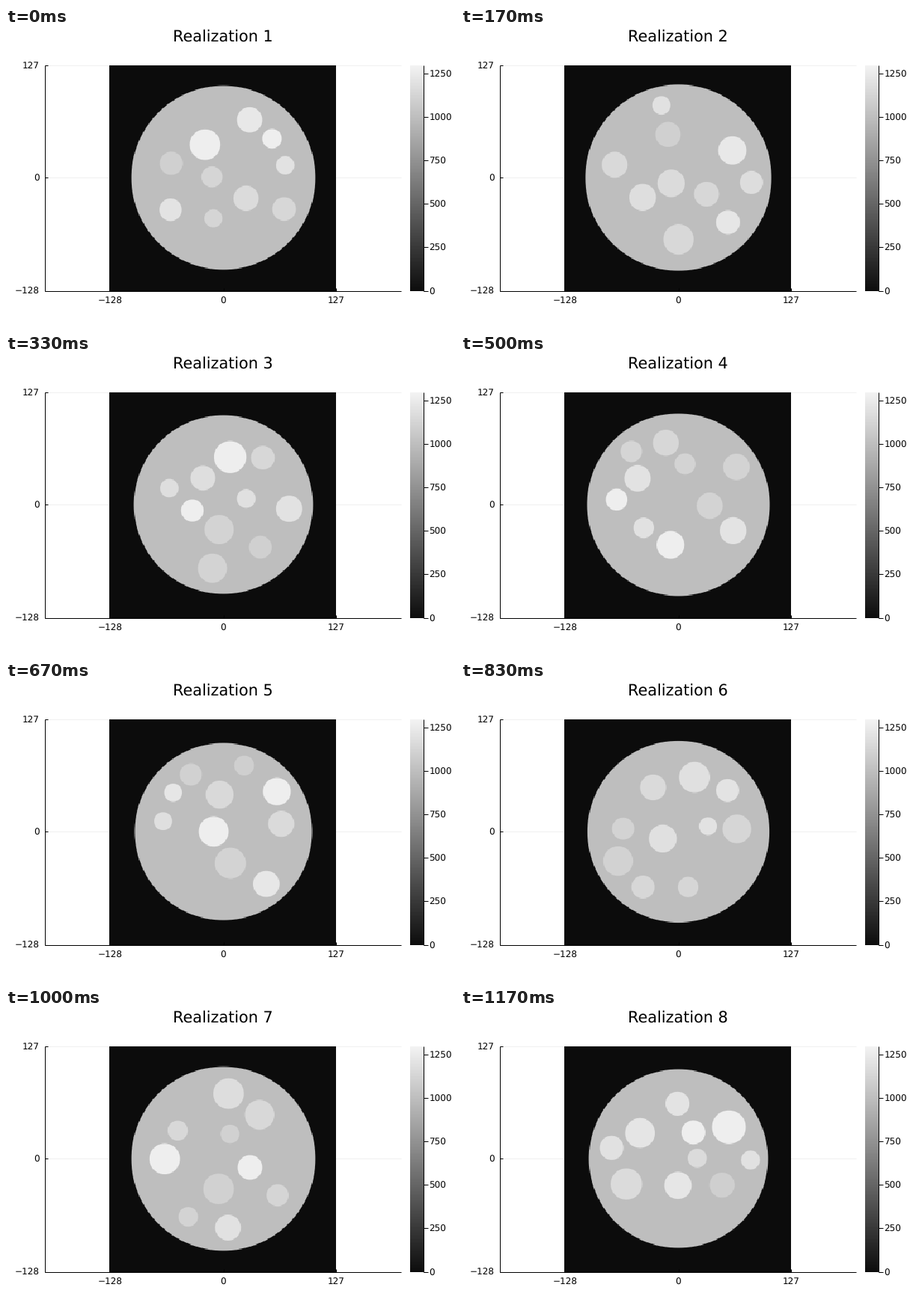
Animation, 600 px wide and 400 px high, one loop 1340 ms. Source, as a matplotlib script:

```python
import random

import matplotlib.pyplot as plt
import numpy as np
from matplotlib.animation import FuncAnimation

W, H, DPI = 600, 400, 100
PX = 72 / DPI                       # one pixel in points
LOOP, STEP = 1340, 10               # ms
STARTS = [0, 170, 330, 500, 670, 830, 1000, 1170]

LEFT, RIGHT, TOP, BOTTOM = 138, 441, 50, 352
CX, CY = 290.5, 200.2               # disc centre on the stage
CELL = 302 / 255                    # stage pixels per data cell
VMAX, BODY, BRIGHT = 1300, 1000, 1275
BUBBLES, GAP = 10, 5

# Disc radius and the brightest bubbles (x, y, radius) of each realization
SCENES = [
    (123, [(266, 156, 20.5), (355.5, 148, 13)]),
    (124.5, []),
    (119.5, [(299.5, 136.5, 21.5), (249, 208, 15)]),
    (122, [(280, 254, 18.5), (208, 193.5, 14.5)]),
    (118.5, [(277.5, 200, 20), (362, 146.5, 18.5)]),
    (121.5, []),
    (123, [(212, 200.5, 20.5), (326, 212, 16.5)]),
    (119.5, [(358, 158, 22.5), (310.5, 165, 16)]),
]

plt.rcParams["font.family"] = "DejaVu Sans"
plt.rcParams["text.hinting"] = "none"


def fill_disc(seed, disc, bright):
    """Add random bubbles that touch neither each other nor the rim."""
    rng = random.Random(seed)
    bubbles = [(x, y, r, BRIGHT) for x, y, r in bright]
    while len(bubbles) < BUBBLES:
        r = rng.uniform(12, 21)
        x = CX + rng.uniform(-disc, disc)
        y = CY + rng.uniform(-disc, disc)
        inside = np.hypot(x - CX, y - CY) + r < disc - 2 * GAP
        if inside and all(np.hypot(x - a, y - b) > r + s + GAP
                          for a, b, s, _ in bubbles):
            bubbles.append((x, y, r, rng.uniform(1100, 1240)))
    return bubbles


def snap(pixels, centre):
    """Move pixel centres to the centre of the data cell they fall in."""
    return centre + CELL * np.round((pixels + 0.5 - centre) / CELL)


def shade(values):
    return 0.05 + 0.9 * values / VMAX


def phantom(disc, bubbles):
    x = snap(np.arange(LEFT, RIGHT), CX)[None, :]
    y = snap(np.arange(TOP, BOTTOM), CY)[:, None]
    field = np.zeros((BOTTOM - TOP, RIGHT - LEFT))
    for cx, cy, r, value in [(CX, CY, disc, BODY)] + bubbles:
        # Cells on the edge are only partly covered
        cover = np.clip((r - np.hypot(x - cx, y - cy)) / CELL + 0.5, 0, 1)
        field += cover * (value - field)
    return shade(field)


fig = plt.figure(figsize=(W / DPI, H / DPI), dpi=DPI, facecolor="white")
ax = fig.add_axes([0, 0, 1, 1])
ax.axis("off")


def show(data, left, right):
    return ax.imshow(data, cmap="gray", vmin=0, vmax=1, aspect="auto",
                     interpolation="nearest", zorder=2,
                     extent=(left, right, BOTTOM, TOP))


def line(x0, y0, x1, y1, color="black", z=3):
    ax.plot([x0, x1], [y0, y1], color=color, lw=PX,
            solid_capstyle="butt", zorder=z)


def label(x, y, text, size=12, ha="center"):
    return ax.text(x, y, text, fontsize=size * PX, ha=ha, va="baseline", zorder=4)


images = [phantom(disc, fill_disc(seed, disc, bright))
          for seed, (disc, bright) in enumerate(SCENES, 1)]
picture = show(images[0], LEFT, RIGHT)
ramp = np.linspace(VMAX, 0, BOTTOM - TOP)[:, None]
show(shade(ramp), 540, 558)

# Main axes
line(51.5, TOP, 51.5, BOTTOM)
line(52, 351.5, 528, 351.5)
for value in (-128, 0, 127):
    text = str(value).replace("-", "\u2212")
    x = CX + CELL * value
    y = BOTTOM - CELL * (value + 128) - 0.5
    line(52, y, 528, y, "#f0f0f0", z=1)
    line(52, y, 56, y)
    label(44.5, y + 4.8, text, ha="right")
    line(x, 348, x, 352)
    label(x, 368.5, text)

# Colour scale
line(557.5, TOP, 557.5, BOTTOM)
for value in range(0, VMAX, 250):
    y = BOTTOM - (BOTTOM - TOP) * value / VMAX
    line(558, y - 0.5, 564, y - 0.5)
    label(565.5, y + 4.4, str(value), ha="left")

title = label(290.3, 18.8, "Realization 1", size=20.8)

ax.set_xlim(0, W)
ax.set_ylim(H, 0)


def update(frame):
    index = int(np.searchsorted(STARTS, frame * STEP, side="right")) - 1
    picture.set_data(images[index])
    title.set_text(f"Realization {index + 1}")
    return picture, title


anim = FuncAnimation(fig, update, frames=LOOP // STEP, interval=STEP,
                     repeat=True, repeat_delay=0, blit=False)
plt.show()
```
